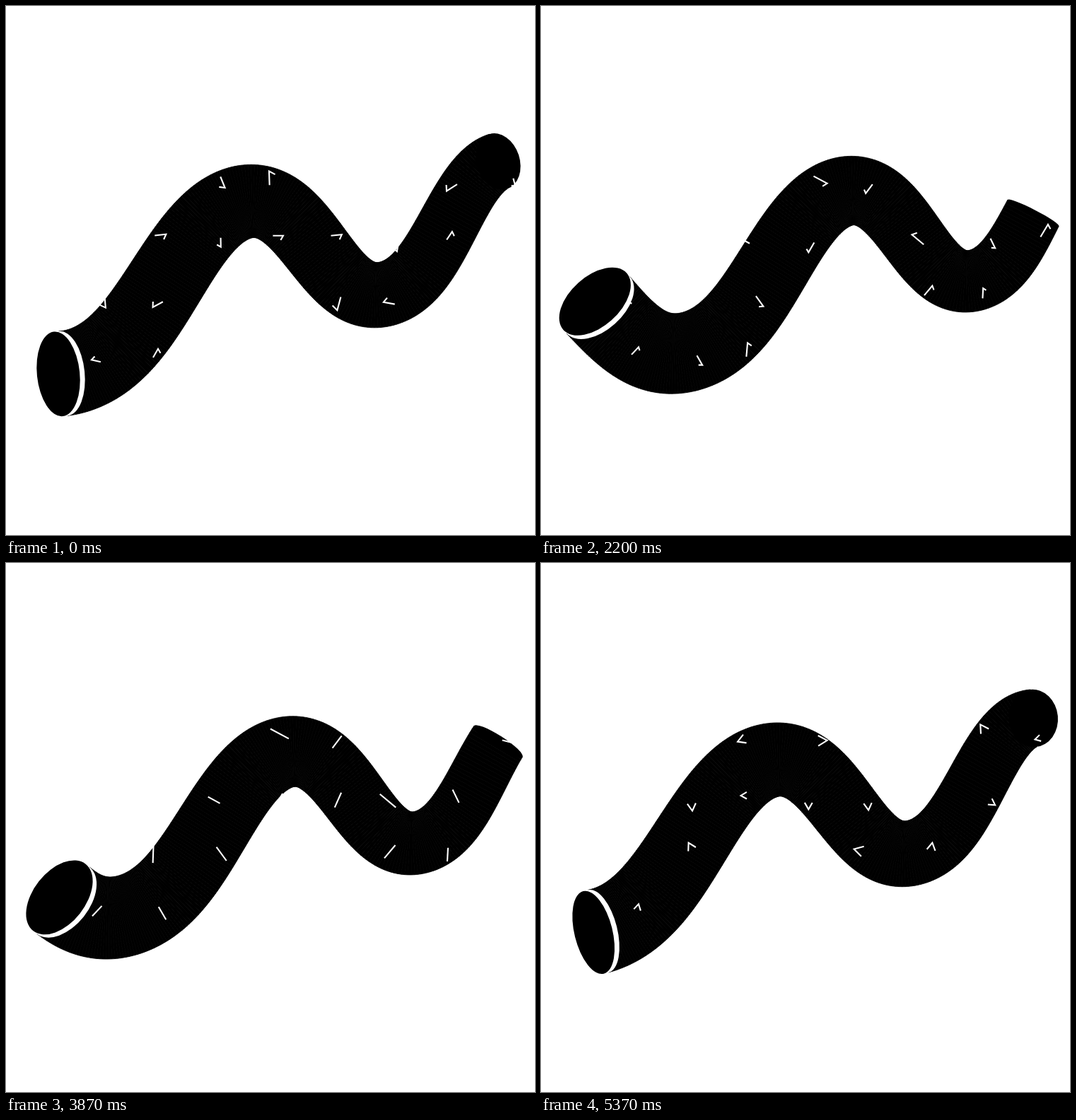
An HTML page with a canvas for the animation above (5410 ms loop, 748 px wide and 748 px high).

```html
<!DOCTYPE html>
<html lang="en">
<head>
<meta charset="utf-8">
<title>Wriggling tube</title>
<style>
  html, body { margin: 0; width: 100%; height: 100%; overflow: hidden; background: #fff; }
  canvas { display: block; width: 100vw; height: 100vh; }
</style>
</head>
<body>
<canvas id="stage" width="748" height="748"></canvas>
<script>
const ctx = document.getElementById('stage').getContext('2d');
const { sin, cos, atan2, hypot, PI, SQRT2 } = Math;
const LOOP = 5410, POSES = 36;
const RIGHT = 696;
const PITCH = 83;

// Heading (degrees) and size of each tick triangle, by grid row and column.
const headings = [
  [0, 20, 190, 38, -122, -23, 118, 117, 45],
  [80, 21, -36, 59, -30, -36, 70, -86, 151],
  [123, 55, 122, -96, 14, 75, 160, 123, 42],
  [0, 163, -90, 125, 0],
  [0, -60]
];
const sizes = [
  [1, 1, .9, 1.05, 1.22, .9, .85, 1.1, .75],
  [1, 1, 1, .8, .9, .95, 1.22, .85, 1.15],
  [.8, 1.1, 1, 1, 1.1, 1.2, 1, .8, 1],
  [1, .82, .87, 1.1, .8],
  [1, .8]
];

const width = x => 114.5 - .063 * (x - 184);

// Travelling wave on a rising axis; wavelength and height shrink to the right.
function height(x, k) {
  const turn = -92.3 * Math.log(1 - .000683 * x) - k - 24.25;
  const p = turn * 2 * PI / POSES;
  const axis = 398.3 - .2049 * (x - 184);
  const amp = 95.7 - .0439 * (x - 184);
  return axis - amp * (1.04 * cos(p) - .03 * cos(3 * p)) + 3.5 * sin(p) ** 2;
}

function spine(x, k) {
  const y = height(x, k);
  const dy = (height(x + .5, k) - height(x - .5, k));
  const len = hypot(1, dy);
  return { x, y, tx: 1 / len, ty: dy / len, r: width(x) / 2 - .4, angle: atan2(dy, 1) };
}

function ellipse(s, shift, ratio, color) {
  ctx.fillStyle = color;
  ctx.beginPath();
  ctx.ellipse(s.x + s.tx * shift, s.y + s.ty * shift,
    s.r * Math.max(ratio, .04), s.r, s.angle, 0, 2 * PI);
  ctx.fill();
}

function tube(left, k) {
  const steps = 240;
  ctx.fillStyle = ctx.strokeStyle = '#000';
  ctx.lineWidth = .8;
  ctx.lineJoin = 'round';
  ctx.setLineDash([]);
  let a = spine(left, k);
  for (let i = 1; i <= steps; i++) {
    const b = spine(left + (RIGHT - left) * i / steps, k);
    ctx.beginPath();
    ctx.moveTo(a.x + a.ty * a.r, a.y - a.tx * a.r);
    ctx.lineTo(b.x + b.ty * b.r, b.y - b.tx * b.r);
    ctx.lineTo(b.x - b.ty * b.r, b.y + b.tx * b.r);
    ctx.lineTo(a.x - a.ty * a.r, a.y + a.tx * a.r);
    ctx.closePath();
    ctx.fill();
    ctx.stroke();
    a = b;
  }
  ellipse(a, 0, .95 * cos(a.angle - .35), '#000');
}

// A dash runs around a small triangle in every grid cell.
function ticks(k) {
  const at = -.045 + .0394 * k;
  ctx.strokeStyle = '#fff';
  ctx.lineWidth = 2.1;
  ctx.lineJoin = 'miter';
  headings.forEach((row, j) => row.forEach((deg, i) => {
    const size = sizes[j][i], r = 17.5 * size;
    const around = 3 * Math.sqrt(3) * r, dash = .265 * around;
    ctx.save();
    ctx.translate(49 + PITCH * i, 248 + PITCH * j);
    ctx.rotate(deg * PI / 180);
    ctx.translate(-3.5 * size, 0);
    ctx.setLineDash([dash, around - dash]);
    ctx.lineDashOffset = dash / 2 - at * around;
    ctx.beginPath();
    for (let n = 0; n < 3; n++) {
      const a = n * 2 * PI / 3;
      ctx.lineTo(r * cos(a), r * sin(a));
    }
    ctx.closePath();
    ctx.stroke();
    ctx.restore();
  }));
}

function draw(k) {
  ctx.fillStyle = '#fff';
  ctx.fillRect(0, 0, 748, 748);
  const left = 81 - 17 * Math.exp(-(((k - 23) / 3) ** 2));
  tube(left, k);
  ticks(k);
  const mouth = spine(left, k);
  const open = .62 * cos(mouth.angle - .52);
  ellipse(mouth, 0, open, '#fff');
  ellipse(mouth, -7, open, '#000');
}

// Poses alternate between 70 ms and 30 ms.
function poseAt(ms) {
  const t = ms % LOOP;
  const n = 2 * Math.floor(t / 100) + (t % 100 >= 70 ? 1 : 0);
  return Math.min(n, 3 * POSES - 1) % POSES;
}

const start = performance.now();
let shown = -1;
function tick() {
  const k = poseAt(performance.now() - start);
  if (k !== shown) draw(shown = k);
  requestAnimationFrame(tick);
}
tick();
</script>
</body>
</html>
```
